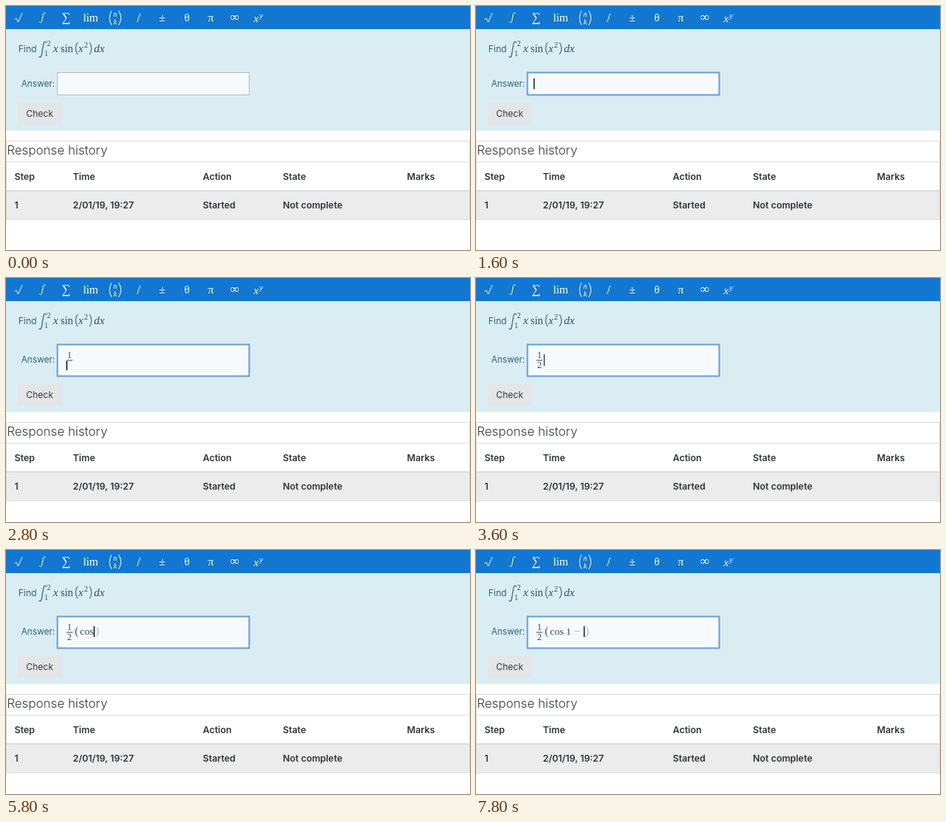
Write an HTML page that moves like this. It is 600 by 317 pixels and loops after 8000 ms.

```html
<!DOCTYPE html>
<html lang="en">
<head>
<meta charset="utf-8">
<title>Answering an integral</title>
<style>
  html, body { margin: 0; width: 100%; height: 100%; overflow: hidden; background: #fff; }
  svg { display: block; width: 600px; height: 317px; }
  text { white-space: pre; }
  .ui { font: 11.6px Inter, Roboto, sans-serif; fill: #373a3c; }
  .ui.teal { fill: #2f6473; }
  .ui.label { font-size: 11.3px; }
  .ui.bold { font-size: 11.9px; font-weight: 600; fill: #303335; }
  .ui.title { font-size: 16.2px; font-weight: 300; }
  .math { font: 14.5px "Liberation Serif", "Noto Serif", serif; fill: #2c5261; }
  .math.tool { fill: #fff; }
  .math.it { font-style: italic; }
  .mid { text-anchor: middle; }
</style>
</head>
<body>
<svg id="stage" viewBox="0 0 600 317" xmlns="http://www.w3.org/2000/svg"></svg>
<script>
const stage = document.getElementById('stage');
const LOOP = 8000;
const GROWTH = 12;

function add(tag, attrs, parent = stage) {
  const node = document.createElementNS('http://www.w3.org/2000/svg', tag);
  for (const key in attrs) node.setAttribute(key, attrs[key]);
  parent.append(node);
  return node;
}
function rect(x, y, width, height, fill, parent) {
  return add('rect', { x, y, width, height, fill }, parent);
}
function text(x, y, content, cls, parent, size) {
  const node = add('text', { x, y, class: cls }, parent);
  if (size) node.style.fontSize = size + 'px';
  node.textContent = content;
  return node;
}
function stroke(d, color, width, parent) {
  return add('path', { d, fill: 'none', stroke: color, 'stroke-width': width, 'stroke-linecap': 'round' }, parent);
}

// Toolbar
rect(0, 0, 600, 30, '#1177d1');
const tool = (x, y, content, size, cls = '') => text(x, y, content, 'math tool mid ' + cls, stage, size);
stroke('M11.5 17 L13.2 15.8 L15.8 21 L21 9.5', '#fff', 0.9);
stroke('M51 9.4 C49.6 7.8 48.4 9 47.8 12 L46.6 18.5 C46 21.6 44.8 22.4 43.4 21', '#fff', 1);
tool(78, 19.5, '∑', 16);
tool(109.5, 20, 'lim', 14.7);
stroke('M136.5 6.5 Q131 15.5 136.5 24.5 M146 6.5 Q151.5 15.5 146 24.5', '#fff', 1);
tool(141.2, 13.5, 'n', 10, 'it');
tool(141.2, 23.5, 'k', 10, 'it');
stroke('M173.6 10 L169.8 20.5', '#fff', 0.9);
tool(202, 20, '±', 15);
tool(234, 20, 'θ', 14.5);
tool(265, 20, 'π', 14.5);
tool(296, 20, '∞', 17);
tool(323.5, 21, 'x', 14.5, 'it');
tool(330, 16, 'y', 11, 'it');

// Question panel
const panel = rect(0, 30, 600, 132, '#daedf3');
text(16, 59.5, 'Find', 'ui teal');
stroke('M52 47.4 C50.8 45.4 49.2 46 48.5 49.5 L46.4 62 C45.8 66 44.6 67.6 43 65.8', '#2c5261', 1.1);
text(53, 51.5, '2', 'math', stage, 10);
text(49.5, 65, '1', 'math', stage, 10);
text(61, 59.5, 'x', 'math it');
text(70.5, 59.5, 'sin', 'math', stage, 14);
stroke('M92.4 47.5 Q87.4 55 92.4 62.8 M108.2 47.5 Q113.2 55 108.2 62.8', '#2c5261', 1);
text(93.5, 59.5, 'x', 'math it');
text(101, 53.5, '2', 'math', stage, 10);
text(113.8, 59.5, 'dx', 'math it');

const label = text(19.8, 105, 'Answer:', 'ui teal label');
const box = add('rect', { x: 66.5, y: 86.5, width: 248, height: 29, fill: '#f7fafd' });

// Everything under the answer box moves down when it grows
const below = add('g', {});
rect(15, 125, 57, 29, '#e4e5e7', below);
text(26, 143.5, 'Check', 'ui', below);
rect(0, 175, 600, 103, '#dddddd', below);
rect(1, 176, 598, 26, '#fff', below);
rect(1, 203, 598, 36, '#fff', below);
rect(1, 241, 598, 36, '#ececec', below);
text(1.2, 193, 'Response history', 'ui title', below);
const columns = [
  [11, 'Step', '1'],
  [86.5, 'Time', '2/01/19, 19:27'],
  [254.5, 'Action', 'Started'],
  [358, 'State', 'Not complete'],
  [518.5, 'Marks', '']
];
for (const [x, head, cell] of columns) {
  text(x, 225.7, head, 'ui bold', below);
  text(x, 262.7, cell, 'ui bold', below);
}

// Typed answer
const lone = text(75.4, 105.5, '1', 'math', stage, 14);
const fraction = add('g', {});
text(82, 104, '1', 'math mid', fraction, 12);
rect(78, 106.5, 8, 1, '#2c5261', fraction);
const lower = text(82, 117, '2', 'math mid', stage, 12);
const open = text(89, 110, '(', 'math', stage, 14);
const close = text(0, 110, ')', 'math', stage, 14);
const word = text(0, 110, '', 'math', stage, 13.5);
const arg = text(116.3, 110, '1', 'math', stage, 13.5);
const minus = text(127, 110, '−', 'math', stage, 14);
const caret = rect(0, 0, 1.3, 14, '#000');

// Each stage of typing: progress level, caret x, top, height, closing bracket x, word
const poses = {
  blank: [0, 74.5, 94, 14],
  one: [1, 81.2, 94, 14],
  over: [2, 78, 108, 12],
  two: [3, 85.6, 108, 12],
  right: [3, 87.6, 99, 15],
  paren: [4, 95.3, 99, 14, 103.3],
  c: [4, 101, 99, 14, 103.3, 'c'],
  co: [4, 108, 99, 14, 110.3, 'co'],
  cos: [4, 113.4, 99, 14, 115.8, 'cos'],
  cos1: [5, 123, 99, 14, 125.3, 'cos'],
  minus: [6, 139.3, 99, 14, 141.5, 'cos']
};

// Start time, pose, caret opacity
const steps = [
  [0, 'blank', 0],
  [600, 'blank', 0.7], [800, 'blank', 1], [1200, 'blank', 0.4], [1400, 'blank', 0],
  [1600, 'blank', 1], [2200, 'blank', 0.4], [2400, 'blank', 0],
  [2600, 'one', 0.85], [2800, 'over', 1],
  [3200, 'two', 0.8], [3400, 'two', 1], [3600, 'right', 0.8], [3800, 'right', 1], [4000, 'right', 0],
  [4400, 'paren', 0.8], [4600, 'paren', 1],
  [5200, 'c', 0.8], [5400, 'co', 0.8], [5600, 'co', 1], [5800, 'cos', 1],
  [6200, 'cos', 0.4], [6400, 'cos', 0], [6600, 'cos1', 1],
  [7200, 'cos1', 0.4], [7400, 'cos1', 0], [7600, 'cos1', 0.8], [7800, 'minus', 1]
];

const show = (node, visible, opacity = 1) => node.setAttribute('opacity', visible ? opacity : 0);

function draw(time) {
  const [, name, blink] = steps.findLast(step => step[0] <= time);
  const [level, x, top, height, closeX = 0, typed = ''] = poses[name];
  const focused = time >= 600;
  const grow = level >= 2 ? GROWTH : 0;

  panel.setAttribute('height', 132 + grow);
  below.setAttribute('transform', `translate(0 ${grow})`);
  label.setAttribute('y', 105 + grow * 0.45);
  box.setAttribute('height', 29 + grow);
  box.setAttribute('stroke', focused ? '#6a9fd0' : '#b4bcc1');
  box.setAttribute('stroke-width', focused ? 2 : 1);

  show(lone, level === 1, 0.8);
  show(fraction, level >= 2);
  show(lower, level >= 3);
  show(open, level >= 4);
  show(close, level >= 4, 0.4);
  show(arg, level >= 5);
  show(minus, level >= 6, 0.5);
  close.setAttribute('x', closeX);
  word.setAttribute('x', typed === 'cos' ? 95.5 : 94);
  word.style.fontStyle = typed === 'cos' ? 'normal' : 'italic';
  word.textContent = typed;

  caret.setAttribute('x', x);
  caret.setAttribute('y', top);
  caret.setAttribute('height', height);
  caret.setAttribute('opacity', blink);
}

const start = performance.now();
function tick() {
  draw((performance.now() - start) % LOOP);
  requestAnimationFrame(tick);
}
tick();
</script>
</body>
</html>
```
